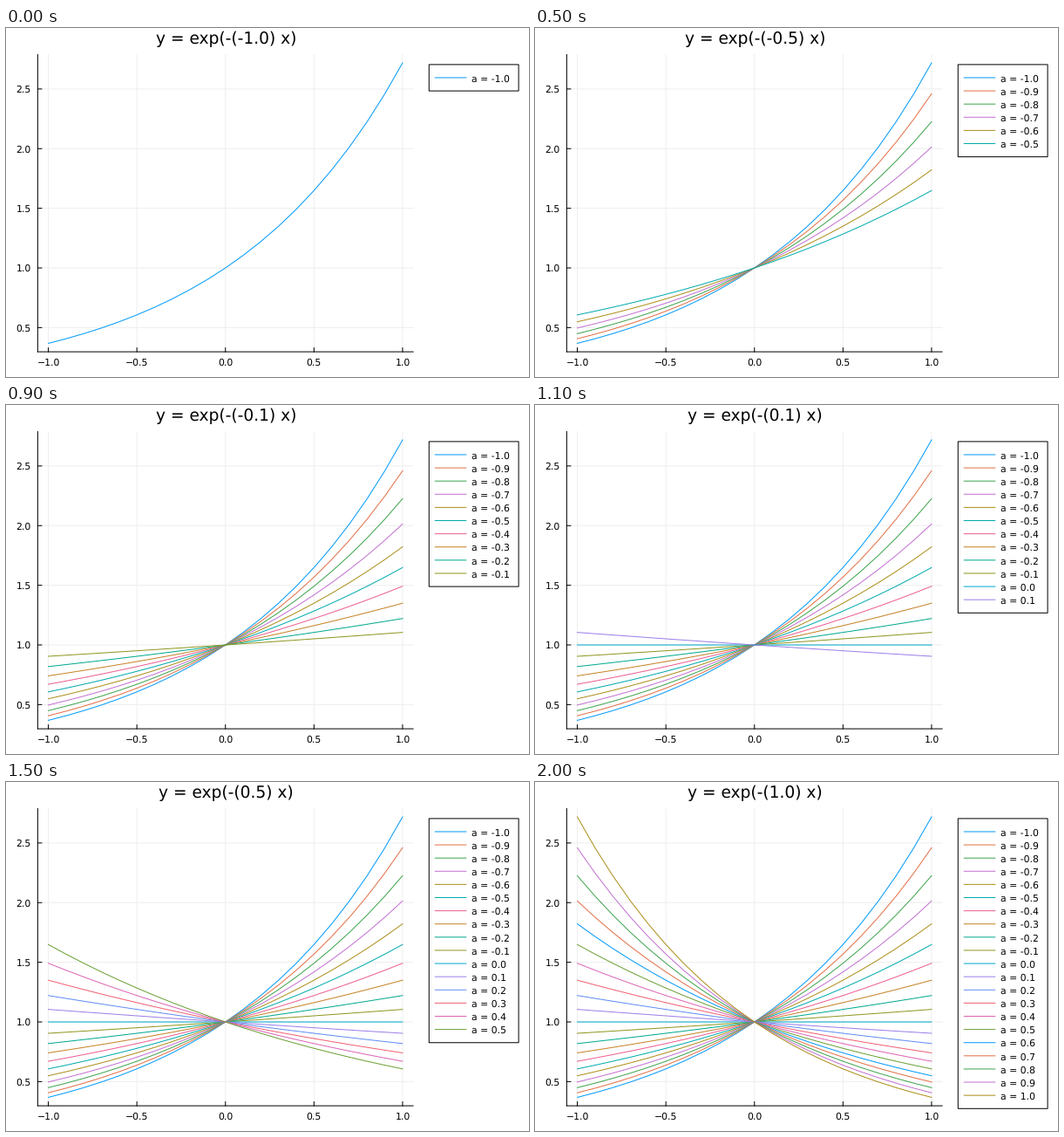
A matplotlib script that plays this animation: 600x400 px, repeating every 2100 ms.

```python
import numpy as np
import matplotlib.pyplot as plt
from matplotlib.animation import FuncAnimation
from matplotlib.patches import Rectangle

W, H, DPI = 600, 400, 100
PX = 72 / DPI                       # points per pixel
LEFT, RIGHT, TOP, BOTTOM = 36.4, 467.1, 30.5, 371.1
ROW = 15.11                         # legend row height
LEG_X, LEG_Y, LEG_W = 485.3, 41.9, 102.8

PALETTE = ["#009AFA", "#E36F47", "#3EA44E", "#C371D2", "#AC8E18", "#00AAAE",
           "#ED5E93", "#C68225", "#00A98D", "#8E971E", "#00A9CC", "#9B7FE9",
           "#618DF6", "#F06073", "#DD65B6", "#6C9F33"]

plt.rcParams["font.family"] = "DejaVu Sans"
plt.rcParams["text.hinting"] = "no_hinting"
fig = plt.figure(figsize=(W / DPI, H / DPI), dpi=DPI, facecolor="white")
ax = fig.add_axes([0, 0, 1, 1])
ax.set_xlim(0, W)
ax.set_ylim(H, 0)
ax.axis("off")


def px(x):
    return 251.75 + 203.2 * x


def py(y):
    return 275 - 136.75 * (y - 1)


def line(x, y, color, **kw):
    return ax.plot(x, y, color=color, lw=PX, snap=False, **kw)[0]


def text(x, y, s, size=10.85, ha="left"):
    return ax.text(x, y, s, fontsize=size * PX, ha=ha, va="baseline", zorder=6)


# Grid, ticks and tick labels
for v in np.arange(-1, 1.1, 0.5):
    line([px(v)] * 2, [TOP, BOTTOM], "#EFEFEF", zorder=1)
    line([px(v)] * 2, [BOTTOM, BOTTOM - 4.5], "black", zorder=2)
    text(px(v), 387, f"{v:.1f}".replace("-", "\u2212"), ha="center")
for v in np.arange(0.5, 2.6, 0.5):
    line([LEFT, RIGHT], [py(v)] * 2, "#EFEFEF", zorder=1)
    line([LEFT, LEFT + 4.5], [py(v)] * 2, "black", zorder=2)
    text(28.7, py(v) + 4.2, f"{v:.1f}", ha="right")
line([LEFT, LEFT], [TOP, BOTTOM], "black", zorder=2)
line([LEFT, RIGHT], [BOTTOM, BOTTOM], "black", zorder=2)

# Curves with their legend rows
values = [k / 10 for k in range(-10, 11)]
xs = np.linspace(-1, 1, 21)
rows = []
for i, a in enumerate(values):
    color = PALETTE[i % len(PALETTE)]
    y = 56.95 + ROW * i
    rows.append([
        line(px(xs), py(np.exp(-a * xs)), color, zorder=3),
        line([491.8, 528.3], [y, y], color, solid_capstyle="butt", zorder=5),
        text(533.5, y + 4.6, f"a = {a:.1f}"),
    ])

box = ax.add_patch(Rectangle((LEG_X, LEG_Y), LEG_W, 30, fc="white", ec="black",
                             lw=PX, snap=False, zorder=4))
title = text(252.4, 17.8, "", 18.6, "center")


def update(n):
    for i, row in enumerate(rows):
        for artist in row:
            artist.set_visible(i <= n)
    box.set_height(30.2 + ROW * n)
    title.set_text(f"y = exp(-({values[n]:.1f}) x)")
    return [box, title] + sum(rows, [])


anim = FuncAnimation(fig, update, frames=len(values), interval=100,
                     repeat=True, repeat_delay=0, blit=False)
plt.show()
```
